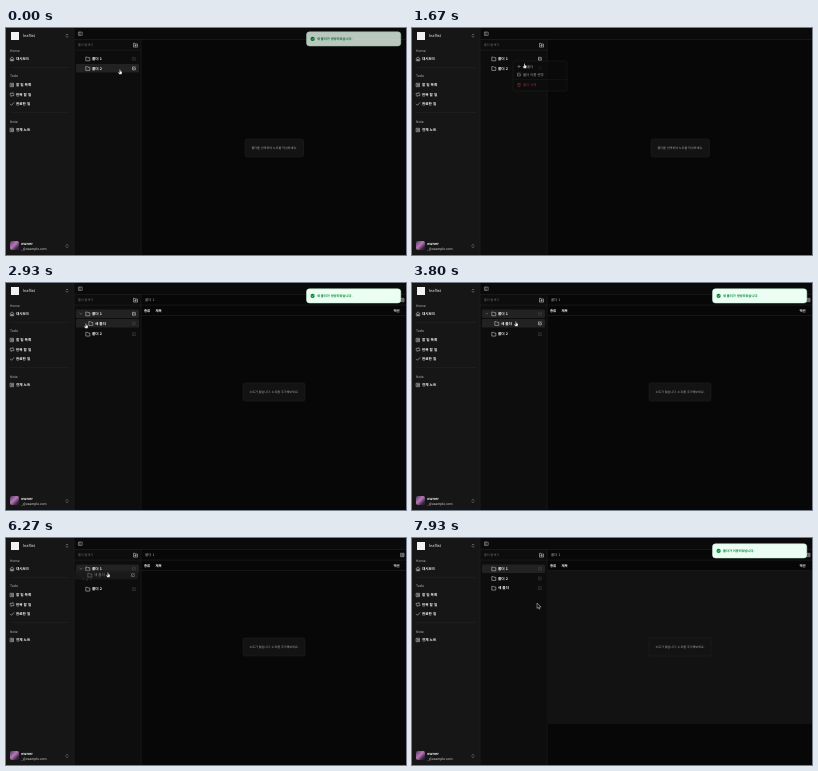
An HTML page for the animation above (8 s loop, 400 by 227 pixels).

```html
<!DOCTYPE html>
<html lang="ko">
<head>
<meta charset="utf-8">
<title>Folder manager</title>
<style>
  html, body { margin: 0; width: 100%; height: 100%; overflow: hidden; background: #070707; }
  svg { display: block; width: 100%; height: 100%; }
  text { font-family: "Noto Sans CJK KR", "Noto Sans CJK", Inter, sans-serif; text-rendering: geometricPrecision; }
</style>
</head>
<body>
<svg viewBox="0 0 400 227">
  <defs>
    <linearGradient id="photo" x1="0" y1="0" x2="1" y2="1">
      <stop offset="0" stop-color="#4a3a66"/>
      <stop offset=".45" stop-color="#b878b4"/>
      <stop offset=".8" stop-color="#33233f"/>
    </linearGradient>
  </defs>
  <g id="frame"></g>
  <g id="scene"></g>
</svg>
<script>
const LOOP = 8000;
const $ = id => document.getElementById(id);
const clamp = v => Math.max(0, Math.min(1, v));
const ramp = (t, a, b) => clamp((t - a) / (b - a));
const ease = p => p * p * (3 - 2 * p);

// Drawing helpers: text and icons are centred vertically on y
const text = (x, y, s, str, fill = '#f2f2f2', weight = 700, anchor = 'start') =>
  `<text x="${x}" y="${y + s * .36}" font-size="${s}" fill="${fill}" font-weight="${weight}" text-anchor="${anchor}">${str}</text>`;
const rect = (x, y, w, h, fill, r = 0, stroke = 'none') =>
  `<rect x="${x}" y="${y}" width="${w}" height="${h}" rx="${r}" fill="${fill}" stroke="${stroke}" stroke-width=".5"/>`;
const path = (x, y, d, stroke = '#ddd', w = .5, fill = 'none') =>
  `<path transform="translate(${x} ${y})" d="${d}" fill="${fill}" stroke="${stroke}" stroke-width="${w}" stroke-linecap="round" stroke-linejoin="round"/>`;
const group = (body, opacity, dy = 0) => opacity > 0
  ? `<g opacity="${opacity}" transform="translate(0 ${dy})">${body}</g>` : '';

const ICON = {
  folder: 'M-2 1.7V-1.7H-.5L.1-1H2V1.7Z',
  folderAdd: 'M-2 1.7V-1.7H-.5L.1-1H2V1.7ZM0-.4V1.2M-.8.4H.8',
  edit: 'M.2-1.4H-1.5V1.5H1.4V-.1M-.4.4L1.5-1.5',
  updown: 'M-.8-.8L0-1.6L.8-.8M-.8 .8L0 1.6L.8 .8',
  home: 'M-1.7 1.7V-.4L0-1.8L1.7-.4V1.7ZM-.5 1.7V.4H.5V1.7',
  list: 'M-1.5-1.7H1.5V1.7H-1.5ZM-.7-.5H.7M-.7.6H.7',
  repeat: 'M-1.8 0V-1.2H1.6L.9-1.9M1.8 0V1.2H-1.6L-.9 1.9',
  check: 'M-1.7.1L-.5 1.3L1.8-1.3',
  panel: 'M-1.7-1.6H1.7V1.6H-1.7ZM-.6-1.6V1.6',
  plus: 'M-1.2 0H1.2M0-1.2V1.2',
  trash: 'M-1.5-1.1H1.5M-1-1.1V1.6H1V-1.1M-.4-1.7H.4'
};
const ARROW = 'M0 0V5L1.2 3.9L2 5.8L2.9 5.4L2.1 3.6H3.7Z';
const HAND = 'M-.5-2.3Q0-2.8.4-2.3V-.7L1.7-.4Q2.1-.3 2 .4L1.7 2.3H-.8L-1.8.6Q-1.8-.1-1.1.2L-.5.7Z';

const navItem = (y, icon, label) => path(6, y, ICON[icon]) + text(10, y, 3.6, label);
const navLabel = (y, label) => text(4, y, 3.4, label, '#c4c4c4', 500);

$('frame').innerHTML =
  rect(0, 0, 68, 227, '#161616') +
  rect(68, 0, 67, 227, '#0d0d0d') +
  rect(68, 0, 332, 11, '#0a0a0a') +
  rect(67.8, 0, .5, 227, '#252525') +
  rect(68, 11, 332, .5, '#252525') +
  rect(134.8, 11, .5, 216, '#252525') +
  rect(68, 21.8, 67, .5, '#252525') +
  rect(4, 39, 60, .5, '#242424') + rect(4, 84.3, 60, .5, '#242424') +
  rect(5, 4, 8, 8, '#f2f2f2') +
  text(17, 7.7, 3.9, 'leaflist', '#eee', 500) + path(61, 7.7, ICON.updown, '#bbb') +
  navLabel(22.6, 'Home') + navItem(30.7, 'home', '대시보드') +
  navLabel(48, 'Todo') + navItem(57, 'list', '할 일 목록') +
  navItem(66.5, 'repeat', '반복 할 일') + navItem(76, 'check', '완료한 일') +
  navLabel(93.5, 'Note') + navItem(102, 'list', '전체 노트') +
  rect(4, 213, 9, 9, 'url(#photo)', 2) +
  text(15, 215.7, 3.8, 'owner') + text(15, 220.6, 3.3, '_@example.com', '#e0e0e0', 500) +
  path(61, 218, ICON.updown, '#bbb') +
  path(74.5, 5.7, ICON.panel, '#bbb') +
  text(72, 17, 3.1, '폴더 탐색기', '#777', 400) + path(129.5, 17, ICON.folderAdd);

// Pointer stops: time, x, y
const STOPS = [
  [0, 114, 44], [70, 114, 44], [780, 128, 31], [930, 128, 31], [1270, 113, 38], [1600, 113, 38],
  [2130, 104, 38], [2530, 104, 38], [2700, 75, 32], [2830, 75, 33], [2930, 80, 43], [3330, 104, 43],
  [3400, 104, 43], [3800, 104, 41], [4270, 104, 41], [4930, 109, 60], [5600, 109, 60],
  [5800, 106, 50], [6070, 106, 50], [6270, 102, 37], [6470, 102, 37], [6600, 103, 50],
  [6870, 103, 50], [7000, 104, 55], [7200, 104, 55], [7670, 127, 65], [7730, 127, 65], [7930, 126, 68]
];
function pointer(t) {
  const i = STOPS.findIndex(s => s[0] > t);
  if (i === 0) return STOPS[0].slice(1);
  if (i < 0) return STOPS.at(-1).slice(1);
  const [a, ax, ay] = STOPS[i - 1], [b, bx, by] = STOPS[i];
  const p = ease(ramp(t, a, b));
  return [ax + (bx - ax) * p, ay + (by - ay) * p];
}

const folderRow = (y, label, { indent = 0, lit, edit } = {}) =>
  (lit ? rect(70, y - 4.2, 63, 8.4, '#222', 1.2) : '') +
  path(81.8 + indent, y, ICON.folder) + text(86 + indent, y, 3.65, label) +
  path(128, y, ICON.edit, edit ? '#eee' : '#484848');

const emptyBox = (x, y, w, label) =>
  rect(x, y, w, 18, '#131313', 2, '#232323') +
  text(x + w / 2, y + 9, 3.05, label, '#a8a8a8', 500, 'middle');

function mainPanel(t) {
  if (t < 1900) return emptyBox(239, 111, 58.5, '폴더를 선택하여 노트를 작성하세요.');
  return (t >= 7400 ? rect(135.3, 33, 264.7, 153, '#121212') : '') +
    rect(135, 21.8, 265, .5, '#252525') + rect(135, 32.4, 265, .5, '#252525') +
    text(139, 17, 3.5, '폴더 1', '#aaa', 400) + path(396.5, 17, ICON.list) +
    text(138, 27.3, 3.4, '종류') + text(149.5, 27.3, 3.4, '제목') + text(387.5, 27.3, 3.4, '액션') +
    emptyBox(237, 100, 62, '노트가 없습니다. 노트를 추가해보세요.');
}

function tree(t, drag) {
  const menuOpen = t >= 890 && t < 1700;
  const open = t >= 2780 && t < 7050, moved = t >= 7050;
  const selected = t >= 1900;
  // The edit button fades a little later than the row
  const over = (row, time) => !drag && !menuOpen && Math.abs(pointer(Math.max(0, time))[1] - row) < 4.3;
  const hover = row => ({ lit: over(row, t), edit: over(row, t - 100) });
  const first = hover(30.7);
  let out = folderRow(30.7, '폴더 1', { lit: first.lit || selected, edit: first.edit || menuOpen });
  if (selected && !moved)
    out += path(74.8, 30.7, open ? 'M-1-.5L0 .5L1-.5' : 'M-.5-1L.5 0L-.5 1', '#888');
  if (drag) out += text(75, 40.5, 3.65, '새 폴더', '#4c4c4c', 400);
  else if (open) out += folderRow(40.3, '새 폴더', { indent: 3, ...hover(40.3) });
  const second = open ? 51 : 40.3;
  out += folderRow(second, '폴더 2', hover(second));
  if (moved) out += folderRow(50, '새 폴더', hover(50));
  return out;
}

function menu(t) {
  return group(
    rect(101, 33, 54, 30, '#0c0c0c', 1.5, '#2a2a2a') +
    path(107, 38.5, ICON.plus) + text(111, 38.5, 3.4, '새 폴더', '#eee', 500) +
    path(107, 46.5, ICON.edit) + text(111, 46.5, 3.4, '폴더 이름 변경', '#eee', 500) +
    rect(101, 51.6, 54, .4, '#2a2a2a') +
    path(107, 57, ICON.trash, '#d33d45') + text(111, 57, 3.4, '폴더 삭제', '#d33d45', 500),
    ramp(t, 870, 1060) * (1 - ramp(t, 1630, 1760)));
}

function toast(label, opacity, dy) {
  return group(
    rect(300.5, 5.8, 94.3, 14.2, '#ecfdf3', 3, '#c3f3d8') +
    '<circle cx="306.6" cy="12.9" r="2.1" fill="#008a2e"/>' +
    path(306.6, 12.9, 'M-.9 0L-.2.7L.9-.6', '#ecfdf3') +
    text(311, 12.9, 3.23, label, '#008a2e'), opacity, dy);
}

function toasts(t) {
  const created = '새 폴더가 생성되었습니다.';
  const gone = .22 + .78 * ramp(t, 70, 230);
  const show = ease(ramp(t, 1850, 2100)), hide = ramp(t, 5600, 5780);
  const last = ease(ramp(t, 7150, 7500));
  return toast(created, 1 - gone, -9 * gone) +
    toast(created, show * (1 - hide), -12 * (1 - show) - 9 * hide) +
    toast('폴더가 이동되었습니다.', last, -12 * (1 - last));
}

function ghost(x, y) {
  const left = x - 33;
  return group(
    rect(left, y - 4.2, 63, 8.4, '#1c1c1c', 1.2) +
    path(left + 14.8, y, ICON.folder, '#999') +
    text(left + 19, y, 3.65, '새 폴더', '#999', 500) +
    path(left + 58, y, ICON.edit, '#aaa'), .85);
}

function draw(now) {
  const t = now % LOOP;
  const [x, y] = pointer(t);
  const drag = t >= 4300 && t < 7050;
  const arrow = (t >= 1700 && t < 2620) || t >= 7250;
  $('scene').innerHTML = mainPanel(t) + tree(t, drag) + (drag ? ghost(x, y) : '') + menu(t) + toasts(t) +
    (arrow ? path(x - 1, y - 2.6, ARROW, '#fff', .4, '#111') : path(x, y, HAND, '#222', .3, '#fff'));
  requestAnimationFrame(draw);
}
draw(0);
</script>
</body>
</html>
```
